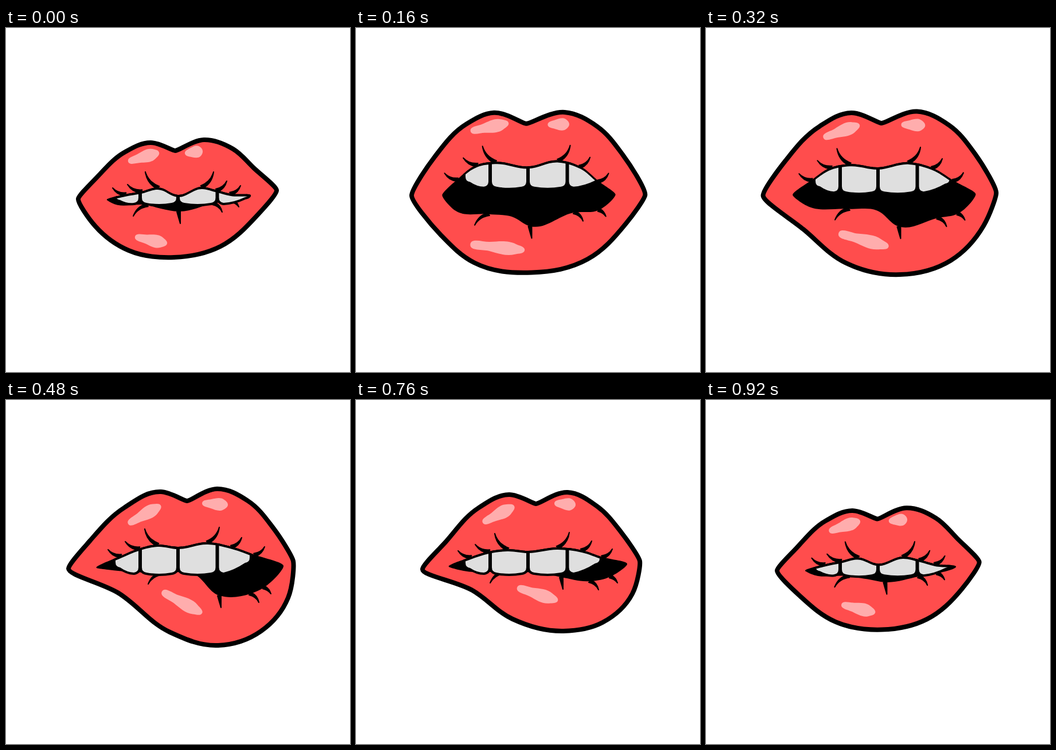
Animation of 600x600 px, one loop 0.96 s. Source, as an HTML page:

```html
<!DOCTYPE html>
<html lang="en">
<head>
<meta charset="utf-8">
<title>Lips</title>
<style>
html, body { margin: 0; width: 100%; height: 100%; overflow: hidden; background: #fff; }
svg { display: block; width: 100%; height: 100%; }
</style>
</head>
<body>
<svg viewBox="0 0 600 600">
  <clipPath id="under"><path class="gum"/></clipPath>
  <clipPath id="inside"><path class="gum" transform="translate(0 4)"/></clipPath>
  <path class="lip" fill="#ff4d4d" stroke="#000" stroke-width="8" stroke-linejoin="round"/>
  <path class="shine" fill="#ffadad"/>
  <path class="creases" stroke="#000" stroke-width="2" stroke-linejoin="round"/>
  <path class="mouth"/>
  <path class="teeth" stroke="#000" stroke-width="8" stroke-linejoin="round" clip-path="url(#under)"/>
  <path class="teeth" fill="#dfdfdf" clip-path="url(#inside)"/>
</svg>
<script>
const LOOP = 960, STEP = 40;
const nums = s => s.split(/[\s,]+/).map(Number);
const shape = (lip, mouth, bite, shine) =>
  ({ lip: nums(lip), mouth: nums(mouth), bite: nums(bite), shine: nums(shine) });

// Lip and mouth run clockwise from the left corner. Bite is the lower edge of
// the teeth at left, centre and right. Each shine is a pair of ends.
const closed = shape(
  '126,298 158,261 208,216 252,200 295,214 345,195 396,211 432,244 472,283 437,328 374,381 293,400 214,388 156,346',
  '176,300 208,290 236,285 265,278 300,291 342,277 368,283 392,289 427,292 394,301 362,306 301,320 270,315 246,309 184,305',
  '299 304 294',
  '213,233 267,217 312,219 343,214 225,364 281,376');
const open = shape(
  '91,291 133,217 190,157 238,137 297,157 368,137 425,163 472,216 511,293 477,345 410,408 309,432 205,414 147,365',
  '145,290 170,259 206,229 238,224 300,231 356,221 396,233 430,263 458,290 430,321 385,325 304,351 272,332 228,328 172,322',
  '261 270 259',
  '197,169 266,155 339,158 378,158 194,380 297,390');
const bite = shape(
  '109,294 146,246 206,188 270,160 316,176 368,155 422,176 466,223 501,281 492,345 445,403 370,428 286,405 195,336',
  '158,293 200,272 232,259 264,252 300,256 352,248 394,256 434,270 484,289 450,327 426,338 372,341 326,303 272,302 178,296',
  '291 300 283',
  '213,216 270,184 342,180 387,183 272,334 342,372');
const clench = shape(
  '116,295 156,248 214,188 267,165 314,181 369,161 420,185 462,230 495,281 482,338 430,388 362,403 273,382 203,332',
  '162,291 200,274 232,264 264,260 300,263 352,257 394,262 430,274 473,286 444,308 408,316 358,309 330,303 258,300 178,296',
  '292 300 284',
  '221,214 276,185 346,180 383,183 281,327 352,350');

const linear = u => u;
const easeOut = u => 1 - (1 - u) ** 1.6;
const moves = [
  { start: 0, end: 240, from: closed, to: open, ease: easeOut },
  { start: 240, end: 480, from: open, to: bite, ease: easeOut },
  { start: 480, end: 760, from: bite, to: clench, ease: linear },
  { start: 760, end: LOOP, from: clench, to: closed, ease: linear },
];

// Creases grow from a mouth point: index, reach in x and y, bend.
const creases = [
  [1, -22, -11, -.25], [2, -24, -12, -.25], [3, -22, -27, -.25],
  [5, 20, -26, .25], [6, 17, -16, .25], [7, 17, -14, .25],
  [9, 12, 11, -.2], [10, 15, 15, -.25], [11, 3, 21, 0], [13, -24, 19, .25],
];
const gaps = [188, 234, 300, 368.5, 428];

const pairs = list => list.filter((_, i) => i % 2 === 0).map((x, i) => [x, list[2 * i + 1]]);
const add = (a, b, k = 1) => [a[0] + b[0] * k, a[1] + b[1] * k];
const sub = (a, b) => add(a, b, -1);
const len = a => Math.hypot(a[0], a[1]) || 1e-6;
const unit = a => [a[0] / len(a), a[1] / len(a)];
const perp = a => [-a[1], a[0]];
const fmt = (...pts) => pts.map(p => p[0].toFixed(2) + ',' + p[1].toFixed(2)).join(' ');

// Bezier segments of a closed curve; tips get short handles.
function segments(pts, tips = []) {
  const n = pts.length, p = i => pts[(i + n) % n];
  const handles = pts.map((_, i) => {
    const a = sub(p(i), p(i - 1)), b = sub(p(i + 1), p(i));
    const dir = unit(add(unit(a), unit(b), len(a) / len(b)));
    const k = tips.includes(i) ? .12 : .35;
    return [dir[0] * k, dir[1] * k];
  });
  return pts.map((a, i) => {
    const b = p(i + 1), d = len(sub(b, a));
    return 'C' + fmt(add(a, handles[i], d), add(b, handles[(i + 1) % n], -d), b);
  });
}

const smooth = (pts, tips) => 'M' + fmt(pts[0]) + segments(pts, tips).join('') + 'Z';

function crease(mouth, [index, dx, dy, bend]) {
  const base = mouth[index], reach = [dx, dy], n = unit(perp(reach));
  const tip = add(base, reach);
  const c = add(add(base, reach, .5), perp(reach), bend);
  return 'M' + fmt(add(base, n, 3)) + 'Q' + fmt(add(c, n, 1.6), tip)
    + 'Q' + fmt(add(c, n, -1.6), add(base, n, -3)) + 'Z';
}

function tooth(i, [left, centre, right]) {
  const edge = [left, centre, centre, centre, right], r = 8;
  const x0 = gaps[i] + 3, x1 = gaps[i + 1] - 3, y0 = edge[i], y1 = edge[i + 1];
  return `M${x0},180V${y0 - r}Q${x0},${y0} ${x0 + r},${y0 + 1}`
    + `Q${(x0 + x1) / 2},${(y0 + y1) / 2 + 5} ${x1 - r},${y1 + 1}`
    + `Q${x1},${y1} ${x1},${y1 - r}V180Z`;
}

// A blob that is narrow at a and round at b.
function blob(a, b) {
  const d = sub(b, a), n = unit(perp(d));
  const side = (k, w) => add(add(a, d, k), n, w);
  return smooth([a, side(.35, -8), side(.83, -9), b, side(.83, 9), side(.35, 8)]);
}

function set(name, d) {
  for (const el of document.querySelectorAll('.' + name)) el.setAttribute('d', d);
}

function draw(t) {
  const { start, end, from, to, ease } = moves.find(m => t < m.end);
  const u = ease((t - start) / (end - start));
  const mix = part => from[part].map((v, i) => v + (to[part][i] - v) * u);

  const mouth = pairs(mix('mouth')), tips = [0, 8];
  const upper = segments(mouth, tips).slice(0, 8).join('');
  const teeth = mix('bite'), shine = pairs(mix('shine'));

  set('lip', smooth(pairs(mix('lip')), [0, 4, 8]));
  set('mouth', smooth(mouth, tips));
  set('gum', 'M' + fmt(mouth[0]) + upper + 'V360H' + mouth[0][0] + 'Z');
  set('teeth', [0, 1, 2, 3].map(i => tooth(i, teeth)).join(''));
  set('creases', creases.map(c => crease(mouth, c)).join(''));
  set('shine', [0, 2, 4].map(i => blob(shine[i], shine[i + 1])).join(''));
}

const begin = performance.now();
function tick() {
  const t = (performance.now() - begin) % LOOP;
  draw(Math.floor(t / STEP) * STEP);
  requestAnimationFrame(tick);
}
tick();
</script>
</body>
</html>
```
